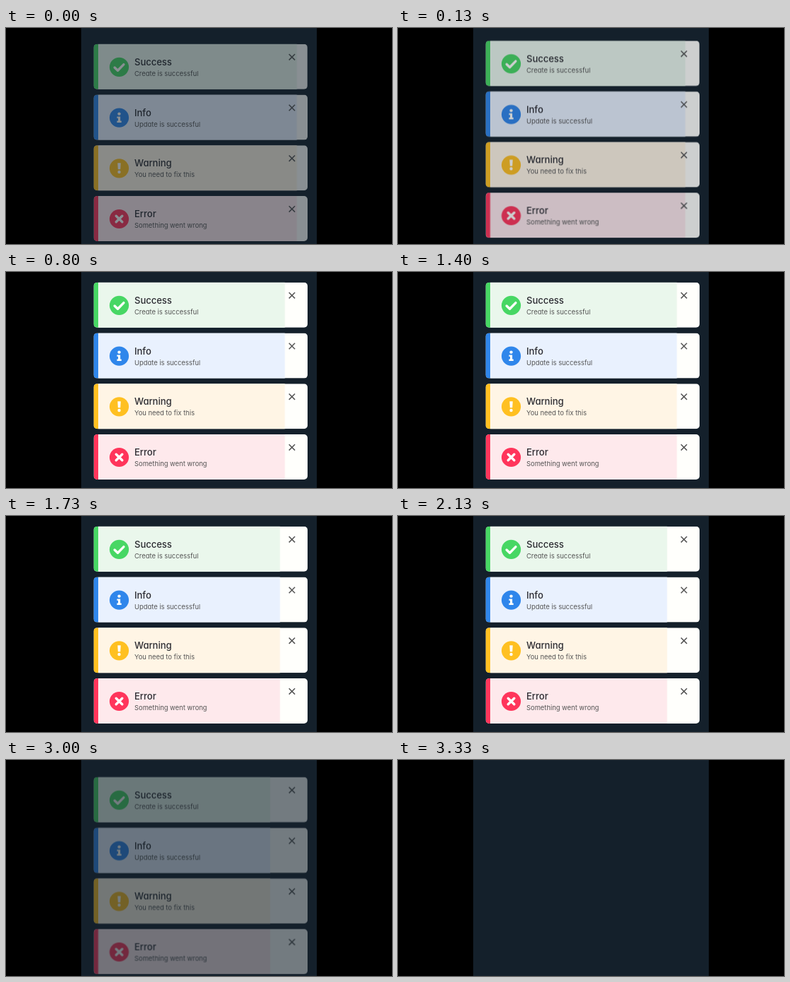
An HTML page for the animation above (3740 ms loop, 544 by 306 pixels).

```html
<!DOCTYPE html>
<html lang="en">
<head>
<meta charset="utf-8">
<title>Toasts</title>
<style>
  @property --show { syntax: "<number>"; inherits: false; initial-value: 0; }

  html, body { margin: 0; width: 100%; height: 100%; overflow: hidden; background: #000; }
  svg { display: block; }

  .stack {
    opacity: var(--show);
    transform: translateY(calc((1 - var(--show)) * 16px));
    animation: toast 3740ms step-end -4ms infinite;
  }
  .bar {
    transform-origin: 6.5px 0;
    animation: drain 3740ms linear -4ms infinite;
  }

  .ok   { --main: #47d764; --tint: #eaf7ec; }
  .info { --main: #2f86eb; --tint: #e9f1fe; }
  .warn { --main: #ffc021; --tint: #fff5e5; }
  .err  { --main: #ff355b; --tint: #fee9ec; }

  .card { fill: #fffffc; }
  .bar { fill: var(--tint); }
  .edge, .disc { fill: var(--main); }
  .mark { fill: none; stroke: #fffffc; stroke-width: 3.4; stroke-linecap: round; stroke-linejoin: round; }
  .solid { fill: #fffffc; }
  .close { fill: none; stroke: #555; stroke-width: 1.5; }
  text { font-family: Inter, "Open Sans", sans-serif; font-feature-settings: "cv11"; }
  .title { font-size: 13px; font-weight: 500; fill: #2b2b31; }
  .note { font-size: 9.4px; fill: #555; }

  /* 15 pictures a second, one step each */
  @keyframes toast {
    0% { --show: .5; }
    1.783% { --show: .66; }
    3.565% { --show: .79; }
    5.348% { --show: .88; }
    7.13% { --show: .94; }
    8.913% { --show: .98; }
    10.695% { --show: 1; }
    76.649% { --show: .93; }
    78.431% { --show: .7; }
    80.214% { --show: .41; }
    81.996% { --show: .21; }
    83.779% { --show: .08; }
    85.561%, 100% { --show: 0; }
  }
  @keyframes drain {
    0% { transform: scaleX(.949); animation-timing-function: steps(2); }
    3.565% { transform: scaleX(.915); animation-timing-function: steps(10); }
    21.39% { transform: scaleX(.681); animation-timing-function: steps(9); }
    37.433% { transform: scaleX(.483); animation-timing-function: steps(11); }
    57.041% { transform: scaleX(.251); animation-timing-function: steps(11); }
    76.649%, 100% { transform: scaleX(0); }
  }
</style>
</head>
<body>
<svg width="544" height="306" viewBox="0 0 544 306">
  <defs>
    <clipPath id="round"><rect width="301.5" height="64" rx="5"/></clipPath>
    <g id="base">
      <g clip-path="url(#round)">
        <rect class="card" width="301.5" height="64"/>
        <rect class="bar" x="6.5" width="295" height="64"/>
        <rect class="edge" width="6.5" height="64"/>
      </g>
      <circle class="disc" cx="36" cy="32.5" r="13.6"/>
      <path class="close" d="M275.3 14.2l8.4 8.4m0-8.4l-8.4 8.4"/>
    </g>
  </defs>
  <rect width="544" height="306"/>
  <rect x="106" width="332" height="306" fill="#14202b"/>
  <g class="stack">
    <g class="ok" transform="translate(123.5 14.8)">
      <use href="#base"/>
      <path class="mark" d="M29.6 33.2l4.4 4.3 8.4-8.7"/>
      <text class="title" x="57.5" y="30.2">Success</text>
      <text class="note" x="57.5" y="45">Create is successful</text>
    </g>
    <g class="info" transform="translate(123.5 86.6)">
      <use href="#base"/>
      <circle class="solid" cx="36" cy="27" r="2.2"/>
      <path class="solid" d="M32.9 30.8h4.7v6.2h1.6v2.4h-6.3V37h1.6v-3.8h-1.6z"/>
      <text class="title" x="57.5" y="30.2">Info</text>
      <text class="note" x="57.5" y="45">Update is successful</text>
    </g>
    <g class="warn" transform="translate(123.5 158.3)">
      <use href="#base"/>
      <path class="solid" d="M33.8 25h4.4l-.5 9h-3.4z"/>
      <circle class="solid" cx="36" cy="37.7" r="2.2"/>
      <text class="title" x="57.5" y="30.2">Warning</text>
      <text class="note" x="57.5" y="45">You need to fix this</text>
    </g>
    <g class="err" transform="translate(123.5 230)">
      <use href="#base"/>
      <path class="mark" d="M31.7 28.2l8.6 8.6m0-8.6l-8.6 8.6"/>
      <text class="title" x="57.5" y="30.2">Error</text>
      <text class="note" x="57.5" y="45">Something went wrong</text>
    </g>
  </g>
</svg>
</body>
</html>
```
